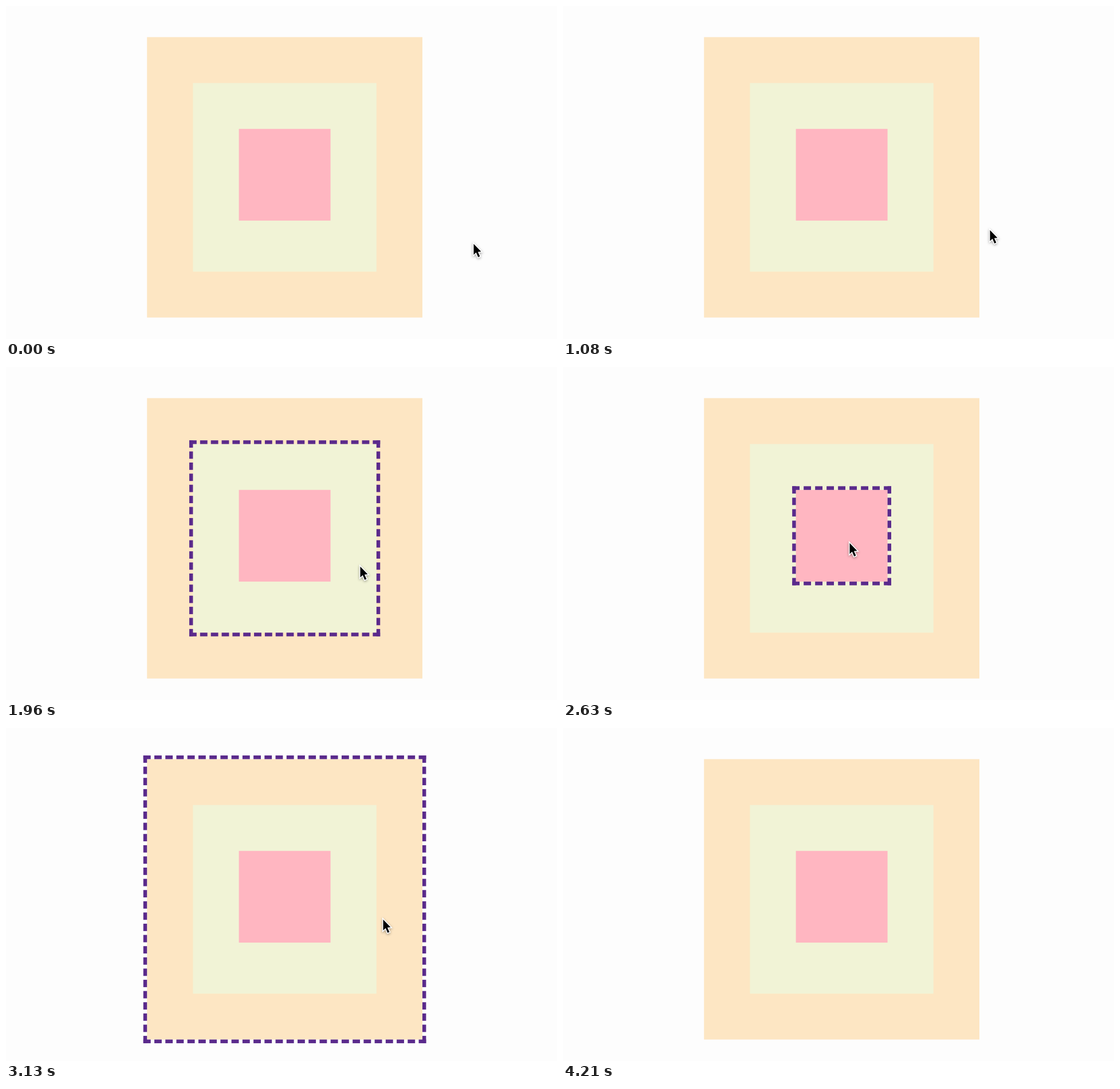
These frames come from a looping animation (962 by 582 pixels, 4830 ms). An HTML page with a canvas:

```html
<!DOCTYPE html>
<html lang="en">
<head>
<meta charset="utf-8">
<title>Nested hover boxes</title>
<style>
  html, body { margin: 0; width: 100%; height: 100%; overflow: hidden; background: #fdfdfd; }
  canvas { display: block; }
</style>
</head>
<body>
<canvas id="stage" width="962" height="582"></canvas>
<script>
const ctx = document.getElementById('stage').getContext('2d');
const LOOP = 4830, TICKS_PER_MS = 0.024, LINE = 6.42, INSET = 80.2;

// Each box is inset evenly in the one around it; the innermost has a little more room below
const boxes = ['#fde6c3', '#f1f3d6', '#ffb6c1'].map((fill, i) => {
  const inset = i * INSET;
  const x = 246.2 + inset, y = 54.4 + inset;
  const bottom = 544.5 - inset - (i === 2 ? 9 : 0);
  return { x, y, w: 727 - inset - x, h: bottom - y, fill };
});

// Key points of the pointer: tick, x, y
const path = [
  [17, 816, 414], [26, 745, 390], [36, 692, 374], [47, 618, 347],
  [63, 500, 306], [69, 573, 324], [75, 658, 333], [82, 718, 339],
  [88, 829, 341], [95, 829, 341], [98, 857, 172], [104, 1080, -250]
];

const arrow = new Path2D('M0 0V19L4.3 15.1L7.8 23.2L10.9 21.9L7.4 14L13 13.6Z');

// Slope at a key point; zero at the ends and next to a pause
function slope(i, c) {
  const a = path[Math.max(i - 1, 0)], p = path[i], b = path[Math.min(i + 1, path.length - 1)];
  return a[c] === p[c] || b[c] === p[c] ? 0 : (b[c] - a[c]) / (b[0] - a[0]);
}

// Smooth cubic through the key points
function pointerAt(tick) {
  const last = path.length - 1;
  const t = Math.min(Math.max(tick, path[0][0]), path[last][0]);
  const i = path.findIndex((p, n) => n > 0 && t <= p[0]) - 1;
  const a = path[i], b = path[i + 1], span = b[0] - a[0];
  const u = (t - a[0]) / span, v = 1 - u;
  return [1, 2].map(c =>
    v * v * (1 + 2 * u) * a[c] + u * u * (3 - 2 * u) * b[c] +
    span * u * v * (v * slope(i, c) - u * slope(i + 1, c)));
}

// Offsets of dashes that start and end flush with both corners
function dashOffsets(side) {
  const count = Math.round(side / (3 * LINE));
  return Array.from({ length: count + 1 }, (_, i) => i * side / count - LINE);
}

function drawOutline({ x, y, w, h }) {
  ctx.fillStyle = '#5a2a8c';
  for (const d of dashOffsets(w))
    for (const top of [y - LINE, y + h]) ctx.fillRect(x + d, top, 2 * LINE, LINE);
  for (const d of dashOffsets(h))
    for (const left of [x - LINE, x + w]) ctx.fillRect(left, y + d, LINE, 2 * LINE);
}

function drawPointer(x, y) {
  ctx.save();
  ctx.translate(x + 0.5, y + 1.7);
  ctx.lineWidth = 3.2;
  ctx.strokeStyle = '#fff';
  ctx.shadowColor = 'rgba(0,0,0,.35)';
  ctx.shadowBlur = 4;
  ctx.shadowOffsetY = 1.5;
  ctx.stroke(arrow);
  ctx.shadowColor = 'transparent';
  ctx.fillStyle = '#000';
  ctx.fill(arrow);
  ctx.restore();
}

function draw(ms) {
  const tick = Math.floor((ms % LOOP + 5) * TICKS_PER_MS);
  const [px, py] = pointerAt(tick);
  ctx.fillStyle = '#fdfdfd';
  ctx.fillRect(0, 0, 962, 582);
  for (const { x, y, w, h, fill } of boxes) {
    ctx.fillStyle = fill;
    ctx.fillRect(x, y, w, h);
  }
  const hovered = boxes.filter(({ x, y, w, h }) =>
    px > x && px < x + w && py > y && py < y + h).pop();
  if (hovered) drawOutline(hovered);
  drawPointer(px, py);
}

const start = performance.now();
function loop() {
  draw(performance.now() - start);
  requestAnimationFrame(loop);
}
loop();
</script>
</body>
</html>
```
